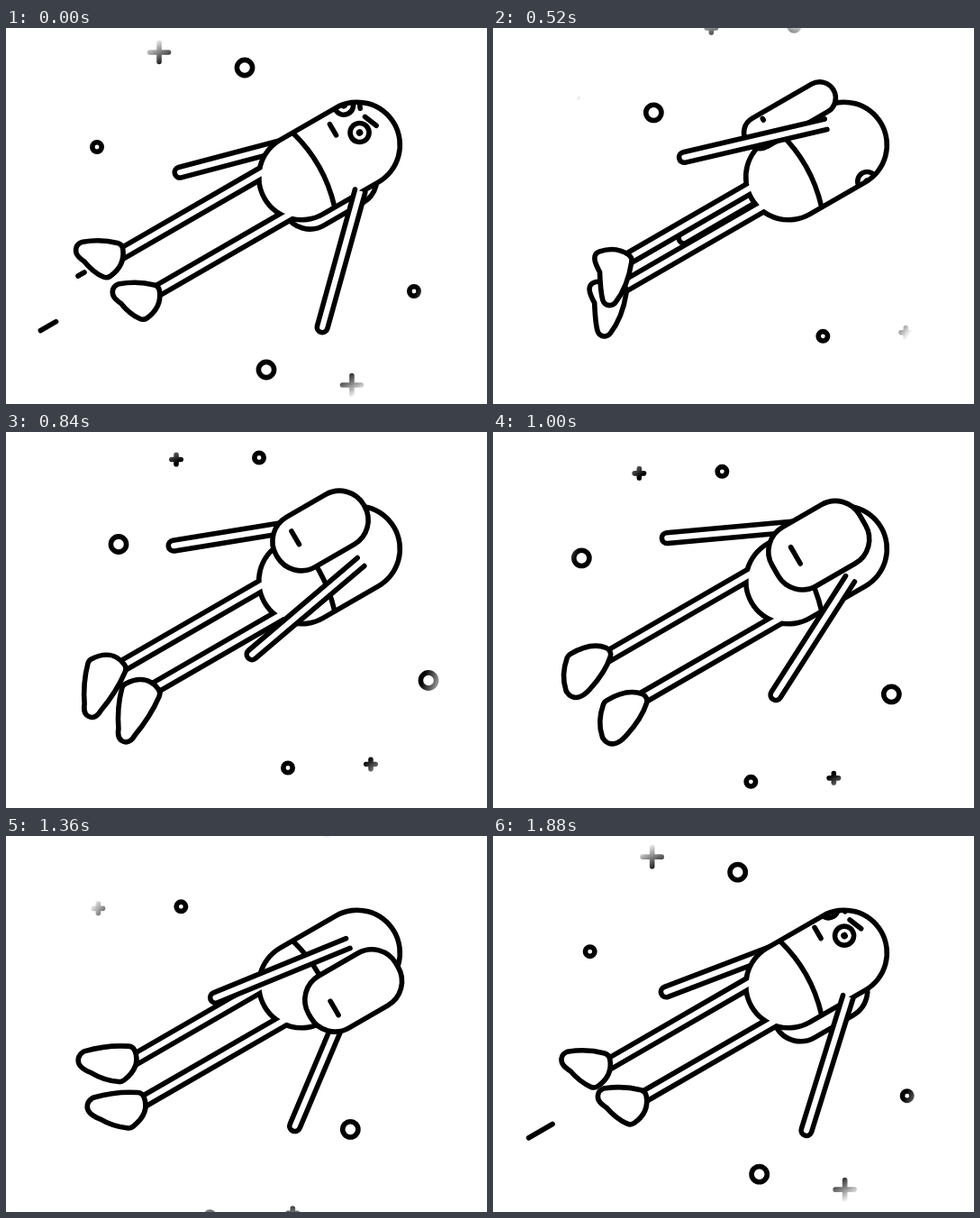
An HTML page with a canvas that plays this animation: 534 by 417 pixels, repeating every 1920 ms.

```html
<!DOCTYPE html>
<html lang="en">
<head>
<meta charset="utf-8">
<title>Spinning flyer</title>
<style>
  html, body { margin: 0; width: 100%; height: 100%; overflow: hidden; background: #fff; }
  canvas { display: block; }
</style>
</head>
<body>
<canvas id="stage" width="534" height="417"></canvas>
<script>
const ctx = document.getElementById('stage').getContext('2d');
const LOOP = 1920, STEP = 40, LINE = 5.6, TUBE = 5.9;
const TILT = Math.PI / 6, RAD = Math.PI / 180;
const BODY_R = 47.5, BODY_HALF = 35.6;
const clamp = x => Math.max(0, Math.min(1, x));
const wrap = t => ((t % LOOP) + LOOP) % LOOP;

// Rows are [time, ...values]; x runs from feet to head, y across the body.
const ARM = [ // hand x, y, shoulder x, y
  [0, -150, -72, 4, -30],
  [120, -139, -105, 11, -48],
  [200, -131, -113, 14, -43],
  [500, -125, -82, 29, -32],
  [840, -124, 43, 32, 14.5],
  [1190, -98.7, 154.5, 13.5, 45.5],
  [1400, -127, 121, 5, 33],
  [1560, -157, 61, -1, 25],
  [1720, -170, 0.5, -12, 0],
  [1880, -157, -61.4, 1, -36]
];
const FOOT = [ // four corners, relative to the ankle, unrotated
  [0, -47, -7, 3, -5, -11, 27, -42, 4],
  [200, -36, -3, 2, -3, -17, 35, -33, 12],
  [520, -33, -6, 3, -1, -20, 53, -31, 12],
  [840, -31, -7, 3, -1, -31, 54, -36, 51],
  [1200, -56, 8, 1, -9, -14, 27, -50, 26],
  [1560, -59, -16, 2, -6, -7, 24, -52, -5]
];
const PACK_LEAD = [[0, 158], [200, 146.5], [520, 177.5], [840, 162.5], [1200, 147], [1560, 136.5]];

const DRIFT = [-320, 184];
const SPECKS = [ // x, y at time 0, size, kind
  [170, 27, 10.5, 'plus'], [265, 44, 8.6, 'ring'],
  [421, -52, 5.2, 'ring'], [329, -50, 5.2, 'plus'],
  [289, 379, 8.6, 'ring'], [453, 292, 5.2, 'ring'],
  [384, 396, 10.5, 'plus'], [545, 288, 5.2, 'plus']
];
const DASHES = [[96.4, 302, 1655], [87, 271, 1900], [113, 324, 185]]; // x, y, start

const haze = ctx.createRadialGradient(276, 211, 197, 276, 211, 227);
haze.addColorStop(0, 'rgba(0,0,0,1)');
haze.addColorStop(1, 'rgba(0,0,0,0)');

// Smooth periodic curve through the rows.
function sample(rows, t) {
  const n = rows.length;
  const row = i => {
    const k = Math.floor(i / n), r = rows[i - k * n];
    return [r[0] + k * LOOP, ...r.slice(1)];
  };
  let i = n - 1;
  while (rows[i][0] > t) i--;
  const [a, b, c, d] = [row(i - 1), row(i), row(i + 1), row(i + 2)];
  const h = c[0] - b[0], s = (t - b[0]) / h, s2 = s * s, s3 = s2 * s;
  return b.slice(1).map((p, j) => {
    j++;
    const m0 = (c[j] - a[j]) / (c[0] - a[0]) * h;
    const m1 = (d[j] - b[j]) / (d[0] - b[0]) * h;
    return (2 * s3 - 3 * s2 + 1) * p + (s3 - 2 * s2 + s) * m0
         + (3 * s2 - 2 * s3) * c[j] + (s3 - s2) * m1;
  });
}

function segment(x1, y1, x2, y2, width = LINE, color = '#000', cap = 'round') {
  ctx.lineWidth = width;
  ctx.strokeStyle = color;
  ctx.lineCap = cap;
  ctx.beginPath();
  ctx.moveTo(x1, y1);
  ctx.lineTo(x2, y2);
  ctx.stroke();
}

function outline() {
  ctx.lineWidth = LINE;
  ctx.strokeStyle = '#000';
  ctx.fillStyle = '#fff';
  ctx.lineCap = 'round';
  ctx.fill();
  ctx.stroke();
}

function circle(x, y, r, color = '#000') {
  ctx.lineWidth = LINE;
  ctx.strokeStyle = color;
  ctx.beginPath();
  ctx.arc(x, y, r, 0, 7);
  ctx.stroke();
}

function plus(x, y, r, color) {
  ctx.lineWidth = LINE;
  ctx.strokeStyle = color;
  ctx.lineCap = 'round';
  ctx.beginPath();
  ctx.moveTo(x - r, y);
  ctx.lineTo(x + r, y);
  ctx.moveTo(x, y - r);
  ctx.lineTo(x, y + r);
  ctx.stroke();
}

function drawSpecks(t) {
  for (const [x, y, r, kind] of SPECKS) {
    for (let k = -1; k <= 1; k++) {
      const p = t / LOOP + k;
      (kind === 'ring' ? circle : plus)(x + DRIFT[0] * p, y + DRIFT[1] * p, r, haze);
    }
  }
}

function drawDashes(t) {
  for (const [x, y, start] of DASHES) {
    const age = wrap(t - start);
    if (age > 330) continue;
    const head = 67 * Math.sin(clamp(age / 260) * Math.PI / 2);
    const tail = 67 * clamp((age - 110) / 220);
    segment(x - head * 0.866, y + head * 0.5, x - tail * 0.866, y + tail * 0.5);
  }
}

function drawArm(t) {
  const [hx, hy, sx, sy] = sample(ARM, t);
  ctx.save();
  ctx.translate(hx, hy);
  ctx.rotate(Math.atan2(sy - hy, sx - hx));
  const len = Math.hypot(sx - hx, sy - hy);
  ctx.beginPath();
  ctx.moveTo(len, -TUBE);
  ctx.lineTo(0, -TUBE);
  ctx.arc(0, 0, TUBE, -Math.PI / 2, Math.PI / 2, true);
  ctx.lineTo(len, TUBE);
  outline();
  ctx.restore();
}

function drawPack(angle, front) {
  const c = Math.cos(angle), s = Math.sin(angle);
  const x = -1.5 + 15.5 * c, y = 59 * s;
  const w = Math.hypot(78 * c, 35 * s);
  ctx.beginPath();
  ctx.roundRect(x - 56, y - w / 2, 112, w, Math.min(w / 2, 31));
  outline();
  if (front) {
    const half = Math.max(0.5, 11 * c);
    segment(x - 28, 70 * s - half, x - 28, 70 * s + half);
  }
}

// Rounded foot: an inset shape, grown again by a wide round stroke.
function drawFoot(leg, corners) {
  const pts = [0, 2, 4, 6].map(i => [corners[i], corners[i + 1]]);
  const cx = pts.reduce((a, p) => a + p[0], 0) / 4;
  const cy = pts.reduce((a, p) => a + p[1], 0) / 4;
  const r = 8;
  const inner = pts.map(([x, y]) => {
    const k = Math.max(0, 1 - r / Math.hypot(x - cx, y - cy));
    return [cx + (x - cx) * k, cy + (y - cy) * k];
  });
  ctx.save();
  ctx.translate(leg.x, leg.footY);
  ctx.rotate(TILT);
  ctx.lineJoin = 'round';
  ctx.beginPath();
  ctx.moveTo(...inner[0]);
  inner.forEach(([x, y], i) => {
    const [nx, ny] = inner[(i + 1) % 4];
    const mx = (x + nx) / 2, my = (y + ny) / 2;
    ctx.quadraticCurveTo(mx + (mx - cx) * 0.5, my + (my - cy) * 0.5, nx, ny);
  });
  ctx.closePath();
  ctx.lineWidth = 2 * r + LINE;
  ctx.strokeStyle = '#000';
  ctx.stroke();
  ctx.lineWidth = 2 * r - LINE;
  ctx.strokeStyle = ctx.fillStyle = '#fff';
  ctx.stroke();
  ctx.fill();
  ctx.restore();
}

function drawFace(t) {
  const s = t > 1200 ? t - LOOP : t;
  if (s < -500 || s > 700) return;
  ctx.save();
  ctx.translate(-0.014 * (s - 200), -28 + 0.15 * s + 5.6e-5 * s * s);
  segment(18, -7, 18, 7);
  for (const side of [-1, 1]) {
    circle(42, side * 17.5, 10.5);
    ctx.fillStyle = '#000';
    ctx.beginPath();
    ctx.arc(42, side * 17.5, 3.8, 0, 7);
    ctx.fill();
    segment(56, side * 5.3, 62, side * 20);
  }
  ctx.restore();
}

function drawBody(t) {
  const turn = (0.1875 * t - 30) * RAD;
  const legs = [1, -1].map(k => ({
    x: -246 + 12 * k * Math.sin(turn),
    y: 1.5 - 32 * k * Math.cos(turn),
    footY: 1.5 - 35 * k * Math.cos(turn)
  }));
  const tubes = (width, color) =>
    legs.forEach(l => segment(l.x - 4, l.y, -BODY_HALF, l.y, width, color, 'butt'));
  const capsule = (r, color) => segment(-BODY_HALF, 0, BODY_HALF, 0, 2 * r, color);

  tubes(2 * TUBE + LINE, '#000');
  capsule(BODY_R + LINE / 2, '#000');
  tubes(2 * TUBE - LINE, '#fff');
  const gap = Math.abs(legs[0].y - legs[1].y);
  if (gap < 11.5) {
    const mid = (legs[0].y + legs[1].y) / 2;
    segment(-245, mid, -BODY_HALF, mid, gap + 2, '#fff', 'butt');
  }
  capsule(BODY_R - LINE / 2, '#fff');

  ctx.save();
  ctx.beginPath();
  ctx.roundRect(-BODY_HALF - BODY_R, -BODY_R, 2 * (BODY_HALF + BODY_R), 2 * BODY_R, BODY_R);
  ctx.clip();
  ctx.lineWidth = LINE;
  ctx.strokeStyle = '#000';
  ctx.beginPath();
  ctx.moveTo(-19.5, -47);
  ctx.quadraticCurveTo(-6, 0, -20.5, 47);
  ctx.stroke();
  drawFace(t);
  ctx.restore();

  const corners = sample(FOOT, t);
  legs.sort((a, b) => a.x - b.x).forEach(l => drawFoot(l, corners));
}

function draw(t) {
  ctx.fillStyle = '#fff';
  ctx.fillRect(0, 0, 534, 417);
  drawSpecks(t);
  drawDashes(t);

  ctx.save();
  ctx.translate(359, 147.5);
  ctx.rotate(-TILT);
  const angle = (sample(PACK_LEAD, t)[0] + 0.1875 * t) * RAD;
  const packFront = Math.cos(angle) > -0.1;
  const arms = [t, wrap(t - 720)];
  const isFront = a => a >= 160 && a < 1300;
  const frontArms = () => arms.filter(isFront).forEach(drawArm);

  if (!packFront) drawPack(angle, false);
  arms.filter(a => !isFront(a)).forEach(drawArm);
  drawBody(t);
  const armsOnTop = t < 700;
  if (!armsOnTop) frontArms();
  if (packFront) drawPack(angle, true);
  if (armsOnTop) frontArms();
  ctx.restore();
}

const begin = performance.now();
function tick() {
  const t = wrap(performance.now() - begin);
  draw(Math.floor(t / STEP) * STEP);
  requestAnimationFrame(tick);
}
tick();
</script>
</body>
</html>
```
